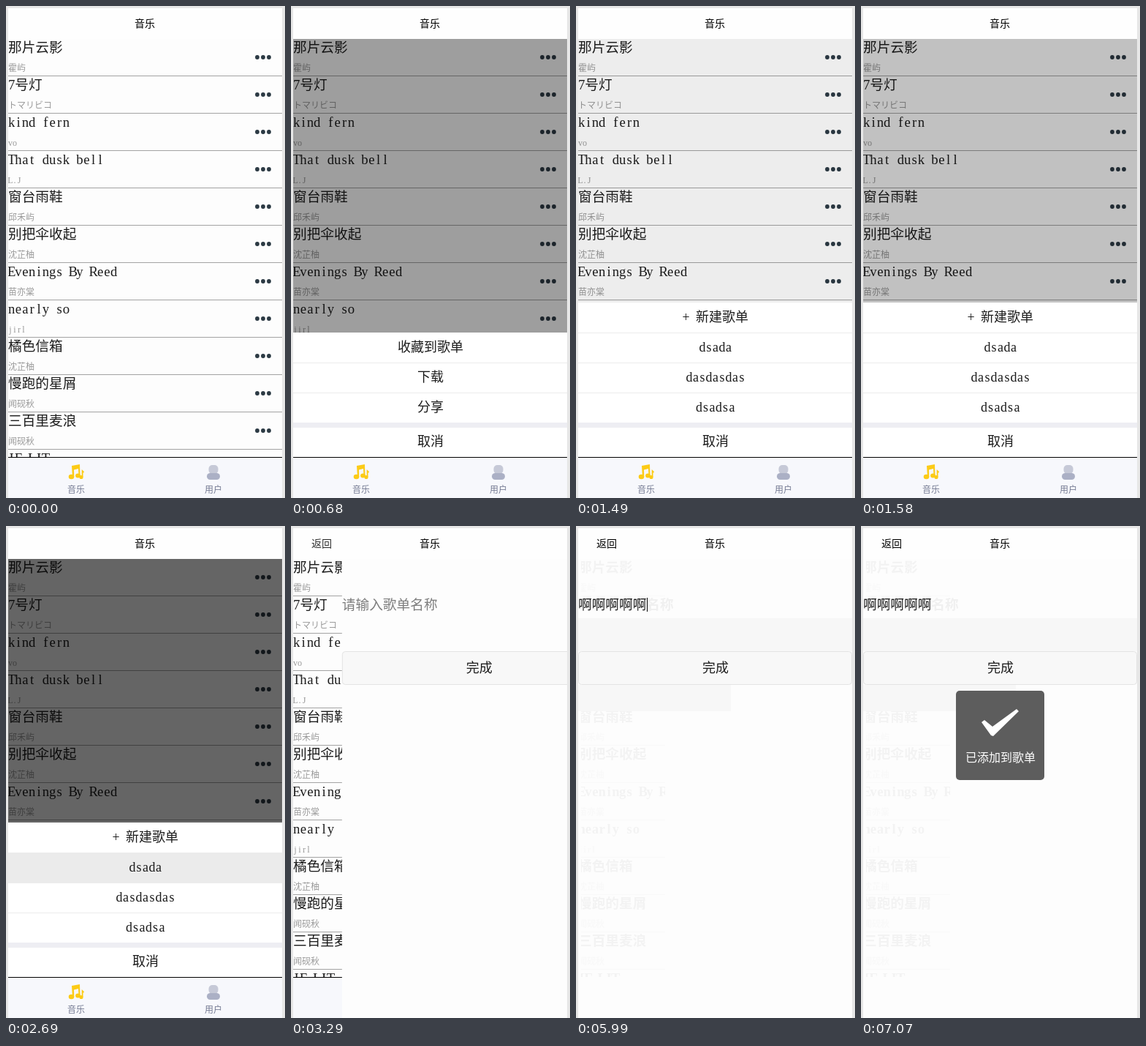
Animation, 382 px wide and 672 px high, one loop 8 s. Source, as an HTML page with a canvas:

```html
<!DOCTYPE html>
<html lang="zh-CN">
<head>
<meta charset="utf-8">
<style>
html, body { margin: 0; width: 100%; height: 100%; overflow: hidden; background: #e8e8e8; }
canvas { display: block; }
</style>
</head>
<body>
<canvas id="stage" width="382" height="672"></canvas>
<script>
const LOOP = 8000, TITLE = 18.67, INK = '#1c1c1c';
const c = document.getElementById('stage').getContext('2d');
const CJK = '"Noto Sans CJK SC", "Noto Sans CJK JP", "Noto Sans CJK", sans-serif';
const LATIN = '"Liberation Serif", serif';

const songs = [
  ['那片云影', '霍屿'], ['7号灯', 'トマリビコ'], ['kind fern', 'vo'],
  ['That dusk bell', 'L.J'], ['窗台雨鞋', '邱禾屿'], ['别把伞收起', '沈芷柚'],
  ['Evenings By Reed', '苗亦棠'], ['nearly so', 'jirl'], ['橘色信箱', '沈芷柚'],
  ['慢跑的星屑', '闻砚秋'], ['三百里麦浪', '闻砚秋'], ['IF LIT', '']
];
const menu = ['收藏到歌单', '下载', '分享'];
const playlists = ['+ 新建歌单', 'dsada', 'dasdasdas', 'dsadsa'];

const clamp = v => Math.max(0, Math.min(1, v));
const easeOut = p => 1 - (1 - clamp(p)) ** 3;
const isWide = ch => ch.charCodeAt(0) > 255;

function rect(x, y, w, h, color) {
  c.fillStyle = color;
  c.fillRect(x, y, w, h);
}

function round(x, y, w, h, r, fill, stroke) {
  c.beginPath();
  c.roundRect(x, y, w, h, r);
  c.fillStyle = fill;
  c.fill();
  if (stroke) { c.strokeStyle = stroke; c.lineWidth = 1; c.stroke(); }
}

function disc(x, y, r, color, ry = r) {
  c.beginPath();
  c.ellipse(x, y, r, ry, 0, 0, 7);
  c.fillStyle = color;
  c.fill();
}

function poly(points, color) {
  c.beginPath();
  points.forEach(p => c.lineTo(...p));
  c.fillStyle = color;
  c.fill();
}

// Text on a grid: wide characters take one em, Latin ones are centred in half an em.
function text(str, x, y, size, color, weight = 300) {
  c.fillStyle = color;
  c.textAlign = 'center';
  for (const ch of str) {
    const wide = isWide(ch), cell = wide ? size : size / 2;
    c.font = `${weight} ${size}px ${wide ? CJK : LATIN}`;
    c.fillText(ch, x + cell / 2, y + size * .36);
    x += cell;
  }
}

function centered(str, x, y, size, color, weight) {
  const w = [...str].reduce((sum, ch) => sum + (isWide(ch) ? size : size / 2), 0);
  text(str, x - w / 2, y, size, color, weight);
}

function clipped(x, y, w, h, draw) {
  c.save();
  c.beginPath();
  c.rect(x, y, w, h);
  c.clip();
  draw();
  c.restore();
}

function list(weight) {
  songs.forEach(([title, artist], i) => {
    const y = 45 + 51 * i;
    text(title, 3, y + 11, TITLE, INK, weight);
    text(artist, 3, y + 40, 12, '#999', weight);
    rect(3, y + 50, 375, 1, '#a3a3a3');
    for (const x of [344, 352, 360]) disc(x, y + 25, 2.9, '#2c3a44');
  });
}

function tabBar() {
  rect(3, 616, 375, 56, '#f7f8fc');
  rect(3, 616, 375, 1, '#000');
  const gold = '#fccb16';
  disc(89.5, 643, 3.8, gold, 3.3);
  disc(98.5, 641.5, 3.4, gold, 3);
  poly([[91, 643], [90, 628], [101, 626], [101.5, 641], [99.5, 641], [99, 632], [93, 633.5], [93.3, 643]], gold);
  disc(103, 643.5, 2.6, gold);
  poly([[103.7, 643], [103.7, 633], [107, 636], [106, 638], [105.5, 637], [105.5, 643]], gold);
  round(277.5, 627, 13, 12, 5, '#c6c9d7');
  round(275, 638, 18, 9, 4.5, '#abb0c5');
  centered('音乐', 96, 661, 12, '#747a92', 400);
  centered('用户', 284, 661, 12, '#747a92', 400);
}

function sheet(items, shift, pressed) {
  const top = 569 - 41 * items.length;
  c.save();
  c.translate(0, shift);
  rect(3, top, 375, 616 - top, '#fff');
  items.forEach((item, i) => {
    const y = top + 41 * i;
    if (i === pressed) rect(3, y, 375, 41, '#ebebeb');
    if (i) rect(3, y, 375, 1, '#ececec');
    centered(item, 191, y + 20, 18, INK);
  });
  rect(3, 569, 375, 7, '#eeeef3');
  centered('取消', 191, 595, 18, INK);
  c.restore();
}

function listPage(t) {
  rect(3, 45, 375, 571, '#fdfdfd');
  clipped(3, 45, 375, 571, () => {
    list();
    if (t < 500 || t >= 2720) return;
    const second = t >= 1490;
    const dim = .6 * clamp((t - (second ? 1460 : 490)) / 305);
    rect(3, 45, 375, 571, `rgba(0,0,0,${dim})`);
    if (second) sheet(playlists, 0, t >= 2690 ? 1 : -1);
    else sheet(menu, 170 * (1 - easeOut((t - 490) / 180)), t >= 1400 ? 0 : -1);
  });
  tabBar();
}

function inputMethod(t) {
  const n = t < 5150 ? 1 : Math.min(5, 2 + Math.floor((t - 5150) / 60));
  const blue = '#1788d0';
  c.globalAlpha = 1 - clamp((t - 5720) / 260);
  rect(3, 118, 379, 56, '#fff');
  rect(3, 119, 379, 27, '#f7f7f7');
  rect(297, 126, 81, 46, '#fcfcfc');
  rect(3, 118, 379, 1, '#a9bfd4');
  rect(3, 173, 379, 1, '#a9bfd4');
  rect(3, 118, 1, 56, '#a9bfd4');
  rect(3, 146, 294, 1, '#dcdcdc');
  const typed = Array(n).fill('a').join("'");
  c.font = 'bold 16px "Liberation Sans", Arial, sans-serif';
  c.textAlign = 'left';
  c.fillStyle = '#0a5fb4';
  c.fillText(typed, 14, 138);
  rect(14 + Math.ceil(c.measureText(typed).width), 124, 1, 18, '#333');
  text('1.' + '啊'.repeat(n), 13, 160, 16, '#e01010');
  if (n === 1) {
    text('2.阿', 59, 160, 16, blue);
    text('3.吖', 104, 160, 16, blue);
    text('4.( ⊙ o ⊙ )啊!', 149, 160, 16, blue);
    text('5.', 298, 160, 16, blue);
  } else {
    text('2.啊', 43 + 16 * n, 160, 16, blue);
    text('3.阿', 88 + 16 * n, 160, 16, blue);
  }
  poly([[357, 163], [365, 163], [361, 167]], '#58abe0');
  c.lineWidth = 1;
  c.strokeStyle = '#d5d5d5';
  c.strokeRect(377.5, 152.5, 8, 14);
  c.globalAlpha *= .35 + .65 * clamp((t - 4640) / 360);
  disc(335, 149, 12, '#d3edc0');
  c.globalAlpha = 1;
}

// Faint remains of the list showing through the form.
function traces() {
  c.globalAlpha = .045;
  for (const [y, h] of [[45, 53], [228, 388]]) clipped(7, y, 115, h, () => list(700));
  c.globalAlpha = 1;
}

function toast(t) {
  c.globalAlpha = clamp((t - 6950) / 115);
  round(130, 225, 121, 122, 5, '#5d5d5d');
  poly([[165, 268], [169, 265], [180, 274], [213, 250], [216, 253], [181, 287], [178, 286]], '#fff');
  centered('已添加到歌单', 191, 316, 16, '#fff');
  c.globalAlpha = 1;
}

function formPage(t) {
  rect(3, 45, 375, 627, '#fdfdfd');
  if (t >= 3700) traces();
  const done = t >= 5720;
  if (done) rect(3, 126, 375, 45, '#f7f7f7');
  if (t >= 5150) {
    const x = done ? 3 : 30;
    rect(x, 217, 212 - x, 36, '#f7f7f7');
  }
  if (done) {
    text('名称', 3 + 5 * TITLE, 107, TITLE, '#f0f0f0', 700);
    text('啊啊啊啊啊', 3, 107, TITLE, INK);
  } else {
    text('请输入歌单名称', 3, 107, TITLE, '#7d7d7d');
  }
  const pressed = t >= 6920 && t < 6980;
  round(3.5, 171.5, 374, 45, 4, pressed ? '#dedede' : '#f8f8f8', '#e4e4e4');
  centered('完成', 191, 194, 18, INK);
  const caret = t >= 3700 && t < 4160 || t >= 4640 && t < 6470;
  if (caret) rect(done ? 97 : 3, 98, 1, 19, '#000');
  if (t >= 4640 && t < 5980) inputMethod(t);
  if (t >= 6950) toast(t);
}

function draw(t) {
  rect(0, 0, 382, 672, '#e7e7e7');
  rect(3, 3, 375, 669, '#fefefe');
  const slide = easeOut((t - 2950) / 780);
  if (slide < 1) listPage(t);
  if (slide > 0) {
    clipped(3, 45, slide < 1 ? 375 : 379, 627, () => {
      c.translate(375 * (1 - slide), 0);
      formPage(t);
    });
  }
  centered('音乐', 190, 24, 14, '#000', 400);
  c.globalAlpha = slide;
  text('返回', 28, 24, 14, '#000', 400);
  c.globalAlpha = 1;
}

const start = performance.now();
function frame() {
  draw((performance.now() - start) % LOOP);
  requestAnimationFrame(frame);
}
frame();
</script>
</body>
</html>
```
